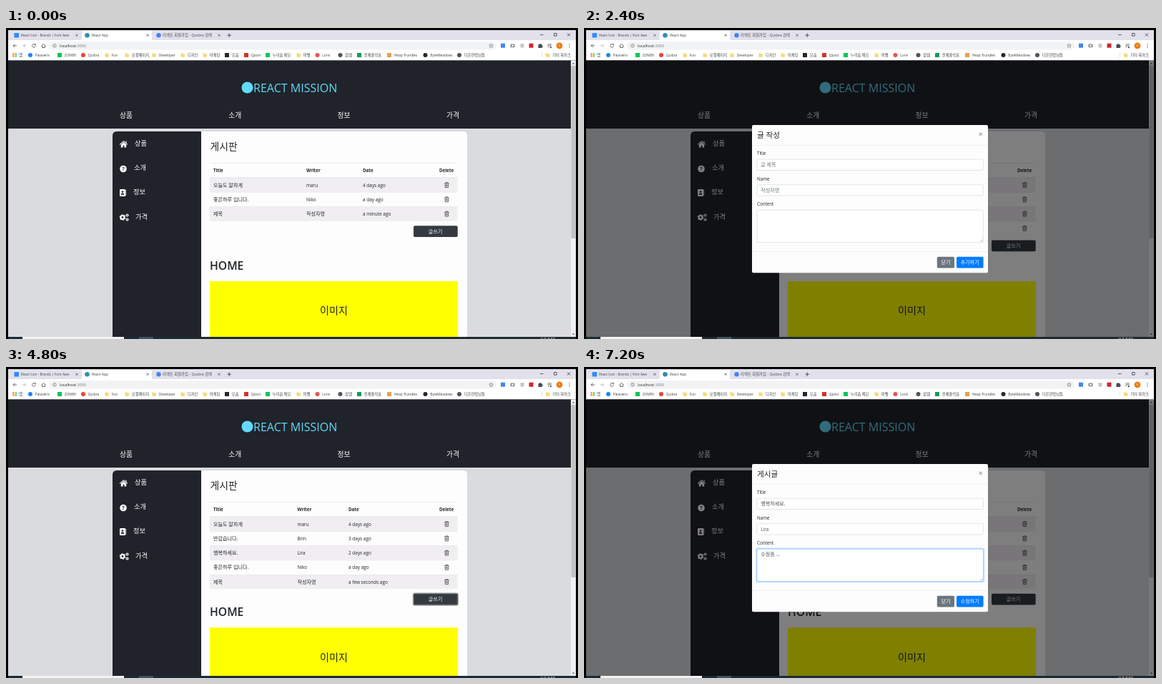
Write an HTML page that moves like this. It is 800 px wide and 436 px high and loops after 8.4 s.

```html
<!DOCTYPE html>
<html lang="ko">
<head>
<meta charset="utf-8">
<style>
  html, body { margin: 0; width: 100%; height: 100%; overflow: hidden; background: #000; }
  svg { display: block; width: 800px; height: 436px; }
  text { font-family: "Open Sans", "Noto Sans CJK KR", "Noto Sans CJK", sans-serif; white-space: pre; }
</style>
</head>
<body>
<svg id="stage" viewBox="0 0 800 436"></svg>
<script>
const DARK = '#20232a', INK = '#212529', GRAY = '#5f6368';

const rect = (x, y, w, h, fill, more = '') =>
  `<rect x="${x}" y="${y}" width="${w}" height="${h}" fill="${fill}" ${more}/>`;
const circle = (x, y, r, fill, more = '') => `<circle cx="${x}" cy="${y}" r="${r}" fill="${fill}" ${more}/>`;
const fillPath = (d, fill) => `<path d="${d}" fill="${fill}"/>`;
const line = (d, color, width = 0.8) => `<path d="${d}" fill="none" stroke="${color}" stroke-width="${width}"/>`;
const cross = (x, y, r, color, width) =>
  line(`M${x - r} ${y - r}l${2 * r} ${2 * r}m0 ${-2 * r}l${-2 * r} ${2 * r}`, color, width);
// Hangul is set slightly larger than Latin
const text = (x, y, s, size, fill = INK, more = '') =>
  `<text x="${x}" y="${y}" font-size="${/[가-힣]/.test(s) ? size * 1.1 : size}" fill="${fill}" ${more}>${s}</text>`;
const MIDDLE = 'text-anchor="middle"', BOLD = 'font-weight="700"';

const folder = x => fillPath(`M${x - 2.5} 35.3h2l.8 .9h2.6v4.6h-5.4z`, '#f8d775');
const square = (x, color) => rect(x - 3, 35, 6, 6, color);
const dot = (x, color) => circle(x, 38, 3, color);

const bookmarks = [
  [34, dot, '#1b87f0', 'Palaverix'], [75, square, '#03c75a', 'ZOMEK'], [108, dot, '#ea4335', 'Quibra'],
  [141, folder, '', 'Fun'], [169, folder, '', '로컬페이지'], [207, folder, '', 'Developer'],
  [247, folder, '', '디자인'], [278, folder, '', '마케팅'], [309, square, '#26262e', '모숨'],
  [336, square, '#d93025', 'Qpost'], [366, square, '#03c75a', '누리솜 메모'], [409, folder, '', '퍼벨'],
  [435.5, dot, '#ec5252', 'Lorvi'], [467.5, dot, '#50555b', '잡템'], [494, square, '#0f9d58', '전체출석표'],
  [536, square, '#e8a04c', 'Heap Trundles'], [586.5, dot, '#25282c', 'ByteMeadows'],
  [634, dot, '#50555b', '다온한벗님들'], [757.5, folder, '', '기타 북마크'],
];

function browser() {
  let s = rect(3, 3, 794, 14, '#e2e1eb') + rect(3, 17, 794, 28.5, '#fff');
  s += fillPath('M104 17q2 0 2-2V6q0-2 2-2h94q2 0 2 2v9q0 2 2 2z', '#fff');
  s += rect(11.5, 7, 6.5, 6.5, '#2d8cff') + circle(113.5, 10.2, 3.3, '#2f8fae') + circle(213.5, 10.2, 3.2, '#4285f4');
  s += text(21, 12, 'React Icon - Brands | Font Awe', 4.7, '#44474d') + text(120, 12, 'React App', 4.9, '#3c4043') +
    text(219, 12, '리액트 회원가입 - Quibra 검색', 4.9, '#44474d');
  for (const x of [99, 198, 298]) s += cross(x, 10.2, 1.6, '#3c4043', 0.7);
  s += line('M309.5 10.2h5.4m-2.7-2.7v5.4', '#3c4043', 0.9);
  s += line('M747 9.5h4.5M766.5 7.5h3.6v3.6h-3.6z', '#222', 0.7) + cross(787, 9.5, 2, '#222', 0.7);

  s += rect(60, 19, 626, 11.5, '#f1f3f4', 'rx="5.7"');
  s += line('M15 24.8h-5m2.3-2.4l-2.4 2.4l2.4 2.4', '#4a4d51') + line('M22.5 24.8h5m-2.3-2.4l2.4 2.4l-2.4 2.4', '#b4b6b9');
  s += line('M40.8 23.2a2.4 2.4 0 1 0 .6 2M41.4 22v1.8h-1.8', '#4a4d51') +
    line('M49.5 25l3-2.6l3 2.6m-5-.5v3h4v-3', '#4a4d51');
  s += circle(68, 24.8, 2.3, 'none', `stroke="${GRAY}" stroke-width=".6"`) + line('M68 24.5v1.6m0-2.8v.6', GRAY, 0.6);
  s += text(75, 26.8, 'localhost<tspan fill="#777b80">:3000</tspan>', 5.5, '#26282b');
  s += line('M678.5 22l.8 1.9l2 .1l-1.5 1.3l.5 2l-1.8-1.1l-1.8 1.1l.5-2l-1.5-1.3l2-.1z', GRAY, 0.6);
  s += rect(692, 21.7, 6, 6, '#4285f4') + rect(705.5, 22.5, 6, 4.8, '#85888c', 'rx="1"') + circle(708.5, 24.9, 1.4, '#fff');
  s += rect(719.5, 22, 5, 5.5, '#c5c8cb') + rect(731.5, 21.7, 6, 6, '#d1242f');
  s += fillPath('M744.5 23h1.7a1 1 0 0 1 2 0h1.6v1.7a1 1 0 0 1 0 2v1.3h-5.3z', '#4a4d51');
  s += line('M757.5 22.8h5.5m-5.5 1.8h5.5m-5.5 1.8h2.5', '#4a4d51', 0.7) + fillPath('M761 25.6l2.8 1.4l-2.8 1.4z', '#4a4d51');
  s += circle(774, 24.8, 4.4, '#ef7b10') + text(774, 26.4, 'K', 4, '#fff', MIDDLE);
  for (const y of [22.7, 24.8, 26.9]) s += circle(788, y, 0.6, '#4a4d51');

  for (let i = 0; i < 9; i++)
    s += rect(9.4 + i % 3 * 2, 35.2 + (i / 3 | 0) * 2, 1.4, 1.4, ['#db4437', '#f4b400', '#0f9d58'][i % 3]);
  s += text(18, 40, '앱', 4.9, '#3c4043');
  for (const [x, icon, color, label] of bookmarks) s += icon(x, color) + text(x + 6.8, 40, label, 4.8, '#3c4043');
  return s + line('M749.5 34.5v7', '#d0d2d5', 0.6);
}

function gear(x, y, r) {
  return circle(x, y, r * 0.85, 'none', `stroke="#fff" stroke-width="${r * 0.7}"`) +
    circle(x, y, r * 1.3, 'none', `stroke="#fff" stroke-width="${r * 0.4}" stroke-dasharray="${r * 0.68}"`);
}

function layout() {
  let s = rect(3, 45.5, 787, 388, '#dadbdf') + rect(3, 45.5, 787, 95.5, DARK);
  s += circle(337.5, 83.5, 8, '#61dafb') + text(346, 89.6, 'REACT MISSION', 16.05, '#61dafb');
  ['상품', '소개', '정보', '가격'].forEach((label, i) => {
    s += text(159 + 152.3 * i, 125.6, label, 8.9, '#fff');
  });
  s += fillPath('M273 145h366q6 0 6 6v282.5H273z', '#fdfdfd') + fillPath('M149 433.5V151q0-6 6-6h118v288.5z', DARK);
  [[180, '상품'], [179, '소개'], [178, '정보'], [181, '가격']].forEach(([x, label], i) => {
    s += text(x, 165 + 34.2 * i, label, 8.4, '#fff');
  });
  s += fillPath('M160.8 163.3l3.7-3.2l3.7 3.2v4.2h-2.7v-2.8h-2v2.8h-2.7z', '#fff') +
    line('M159 163.3l5.5-4.6l5.5 4.6M168 158.6v2.5', '#fff', 1.1);
  s += circle(164, 197.5, 4.8, '#fff') + text(164, 200.2, '?', 7.5, DARK, MIDDLE + BOLD);
  s += rect(159, 226, 8.3, 10, '#fff', 'rx="1.2"') + circle(163, 229.6, 1.3, DARK) +
    fillPath('M160.6 233.7q0-2.2 2.4-2.2t2.4 2.2z', DARK) + line('M167.8 227.5v1.6m0 1v1.6m0 1v1.6', '#fff');
  return s + gear(163, 265.5, 2.9) + gear(169.5, 262.5, 1.5) + gear(169.5, 268.6, 1.5) +
    text(285.5, 170.6, '게시판', 12.6);
}

const first = ['오늘도 알차게', 'maru', '4 days ago'], last = ['좋은하루 입니다.', 'Niko', 'a day ago'];
const middle = [['반갑습니다.', 'Brin', '3 days ago'], ['행복하세요.', 'Lira', '2 days ago']];
const post = when => ['제목', '작성자명', when];
const boards = {
  short: { columns: [290, 420, 499], rows: [first, last, post('a minute ago')] },
  four: { columns: [290, 433, 505.5], rows: [first, ...middle, last] },
  five: { columns: [290, 407.5, 479], rows: [first, ...middle, last, post('a few seconds ago')] },
};

const trash = y => line(`M613.3 ${y - 2.6}h6.2m-4.2 0v-1h2.2v1m-3.5 0l.3 6h4.2l.3-6m-3.1 1.4v3.3m1.3-3.3v3.3`, INK, 0.65);

function board({ columns, rows }, focused) {
  const ROW = 20.25, end = 210 + ROW * rows.length, shift = rows.length > 4 ? 10.3 : 0;
  let s = rect(285, 189, 346.5, 0.6, '#dee2e6');
  ['Title', 'Writer', 'Date'].forEach((label, i) => { s += text(columns[i], 202, label, 6.2, INK, BOLD); });
  s += text(606, 202, 'Delete', 6.2, INK, BOLD);
  rows.forEach((row, i) => {
    const y = 210 + ROW * i;
    if (i % 2 == 0) s += rect(285, y, 346.5, ROW, '#f1eef1');
    s += rect(285, y - (i ? 0 : 0.5), 346.5, i ? 0.5 : 1, '#dee2e6') + trash(y + 10.2);
    row.forEach((cell, j) => { s += text(columns[j], y + 12.5, cell, 6.45); });
  });
  const glow = focused ? 'stroke="#585d61" stroke-opacity=".6" stroke-width="2.4"' : '';
  s += rect(570, end + 6.4, 61.7, 15.8, '#343a40', 'rx="1.8"' + glow) +
    text(600.5, end + 16.8, '글쓰기', 6.5, '#fff', MIDDLE);
  s += text(285, 339 + shift, 'HOME', 15.7, INK, 'font-weight="600"');
  return s + rect(285, 355 + shift, 347, 78.5 - shift, '#ff0') +
    text(458.5, 401.2 + shift, '이미지', 12.8, INK, MIDDLE);
}

function frameEdges() {
  return rect(790, 45.5, 7, 388, '#f1f1f1') + rect(790.5, 53, 6, 242, '#c1c1c1') +
    fillPath('M791.8 50.5l1.7-2l1.7 2zM791.8 428.5l1.7 2l1.7-2z', '#555');
}

function taskbar() {
  return rect(3, 433, 794, 3, '#1c2a33') + rect(23, 433, 142, 3, '#f3f3f3') +
    rect(186, 433, 20, 3, '#42525c') + text(747, 438, '오후 5:07', 4.6, '#fff');
}

function dialog({ title, fields, action, hint, editing, caret }) {
  let s = rect(3, 45.5, 794, 387.5, '#000', 'opacity=".5"');
  s += rect(235, 136, 330, 207.3, '#fdfdfd', 'rx="2"');
  s += rect(235, 164, 330, 0.5, '#dee2e6') + rect(235, 313.5, 330, 0.5, '#dee2e6');
  s += text(242, 153.6, title, 9.6) + cross(554.7, 148.8, 2, '#777', 1);
  ['Title', 'Name', 'Content'].forEach((label, i) => {
    const y = 184 + 35.5 * i, active = editing && i == 2, height = i == 2 ? 45.7 : 15.7;
    s += text(242, y - 5.6, label, 6.25);
    if (active) s += rect(241.2, y - 0.6, 318, height + 1.2, 'none', 'rx="2" stroke="#bfdeff" stroke-width="2"');
    s += rect(242, y + 0.2, 316.4, height - 0.4, '#fff', `rx="1.6" stroke="${active ? '#80bdff' : '#ced4da'}" stroke-width=".6"`);
    s += text(247.3, y + 10.4, fields[i], 6.4, hint ? '#6c757d' : '#495057');
  });
  s += line('M554.5 299.5l3-3m-1.2 3l1.2-1.2', '#777', 0.5);
  if (caret) s += line('M271.2 259v7.6', '#222', 0.6);
  s += rect(493.8, 320.8, 24.2, 15.7, '#6c757d', 'rx="1.7"') + rect(521, 320.8, 37.6, 15.7, '#007bff', 'rx="1.7"');
  return s + text(506, 331.2, '닫기', 6.4, '#fff', MIDDLE) + text(539.8, 331.2, action, 6.4, '#fff', MIDDLE);
}

const write = { title: '글 작성', action: '추가하기' }, edit = { title: '게시글', action: '수정하기' };
const scenes = [
  ['short'],
  ['four'],
  ['four', { ...write, fields: ['글 제목', '작성자명', ''], hint: true }],
  ['four', { ...write, fields: ['제목', '작성자명', '작성중 ..'], editing: true, caret: true }],
  ['five', null, true],
  ['five', { ...edit, fields: ['행복하세요.', 'Lira', '컨텐츠 내용'] }],
  ['five', { ...edit, fields: ['행복하세요.', 'Lira', '수정중 ...'], editing: true }],
].map(([name, modal, focused]) =>
  browser() + layout() + board(boards[name], focused) + frameEdges() + (modal ? dialog(modal) : '') + taskbar());

const stage = document.getElementById('stage'), HOLD = 1200;
let shown = -1;
function tick() {
  const scene = Math.floor(performance.now() / HOLD) % scenes.length;
  if (scene !== shown) stage.innerHTML = scenes[shown = scene];
  requestAnimationFrame(tick);
}
tick();
</script>
</body>
</html>
```
